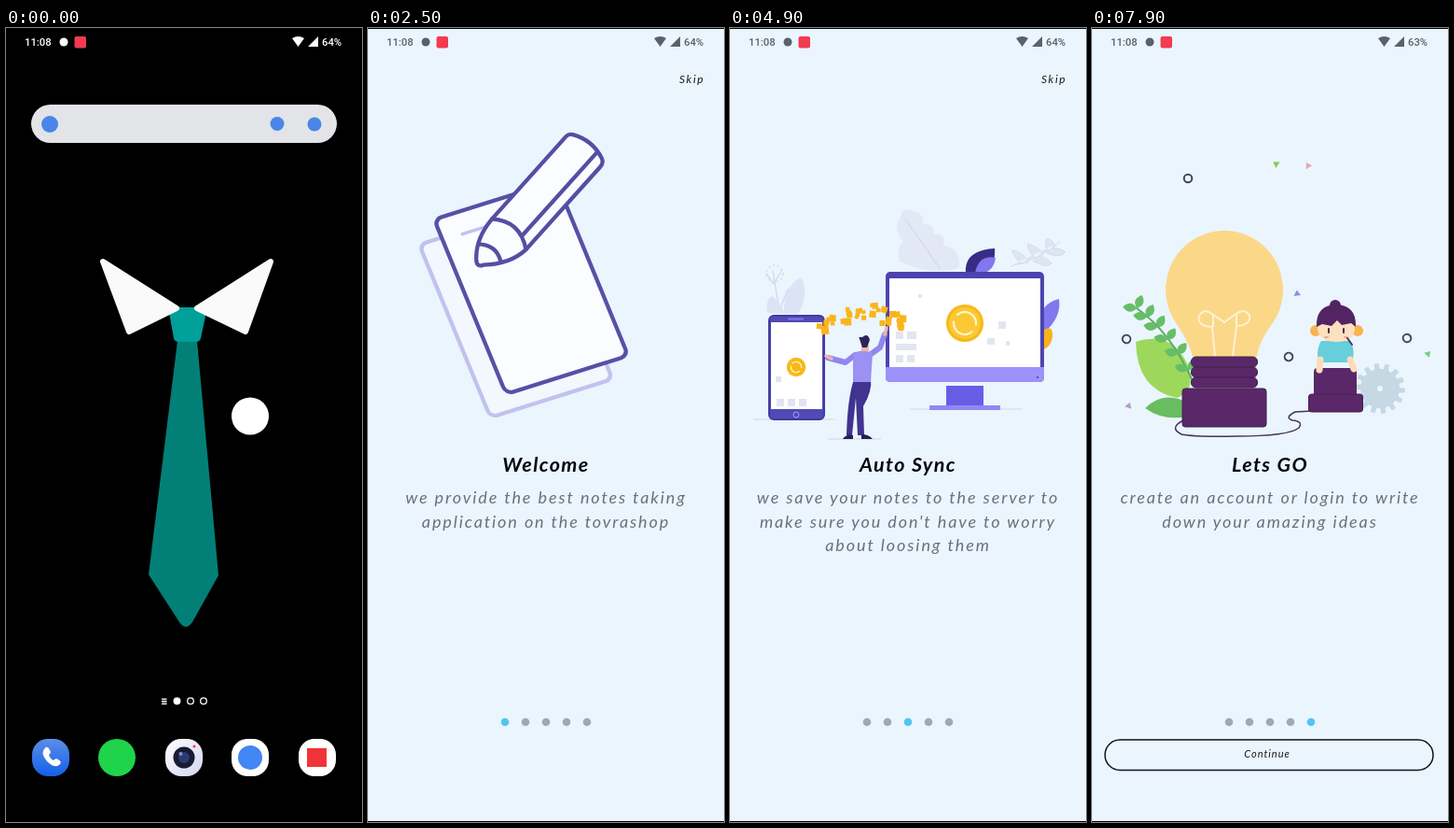
An HTML page that plays this animation: 382 px wide and 850 px high, repeating every 8 s.

```html
<!DOCTYPE html>
<html lang="en">
<head>
<meta charset="utf-8">
<title>Notes app tour</title>
<style>
html, body { margin: 0; width: 100%; height: 100%; overflow: hidden; background: #000; }
svg { display: block; width: 100vw; height: 100vh; }
.status { font: 500 11.3px Roboto, sans-serif; }
.hand { font-family: Lato, sans-serif; font-style: italic; }
.title { font-size: 21.5px; font-weight: 700; letter-spacing: 1.4px; fill: #05070f; }
.sub { font-size: 18px; letter-spacing: 1.9px; fill: #6a7079; }
.small { font-size: 11px; letter-spacing: 1px; fill: #16181c; }
#skip { font-size: 12px; letter-spacing: 1.6px; }
.line { fill: none; stroke-linecap: round; stroke-linejoin: round; }
</style>
</head>
<body>
<svg viewBox="0 0 382 850" preserveAspectRatio="none">
<defs>
  <clipPath id="clip"><rect id="clipBox"/></clipPath>
  <linearGradient id="call" x2="0" y2="1"><stop stop-color="#5d8de8"/><stop offset="1" stop-color="#1260ea"/></linearGradient>
  <linearGradient id="cam" x2="1" y2="1"><stop stop-color="#fff"/><stop offset="1" stop-color="#d3d4f0"/></linearGradient>
  <pattern id="hatch" width="3" height="3" patternUnits="userSpaceOnUse"><rect width="3" height="3" fill="#c9f2fb"/><path d="M0 .7H3M.7 0V3" stroke="#63dcf2" stroke-width="1"/></pattern>
</defs>

<g id="home">
  <rect width="382" height="850"/>
  <rect x="27" y="82" width="328" height="41" rx="20.5" fill="#e2e4e7"/>
  <g fill="#4a86e8"><circle cx="47" cy="103" r="9"/><circle cx="291" cy="102.500" r="7.500"/><circle cx="331" cy="103" r="7.500"/></g>
  <path d="M184 335H205L228 586 200 636Q193 646 186 636L153 585Z" fill="#028078"/>
  <path d="M174 299H216L209 332Q208 336 204 336H185Q181 336 180 332Z" fill="#009f98"/>
  <g fill="#fafafa" stroke="#fafafa" stroke-width="6" stroke-linejoin="round">
    <path d="M104 250 183 300 132 325Z"/><path d="M284 250 205 300 257 325Z"/>
  </g>
  <g fill="none" stroke="#fff" stroke-width="1.300">
    <path d="M167 718.500H172.500M167 721H172.500M167 723.500H172.500"/>
    <circle cx="183.500" cy="720.500" r="3.300" fill="#fff"/><circle cx="198" cy="720.500" r="3.300"/><circle cx="212" cy="720.500" r="3.300"/>
  </g>
  <circle cx="262" cy="415.500" r="20" fill="#fff"/>
  <rect x="28" y="761" width="40" height="40" rx="17" fill="url(#call)"/>
  <path d="M41 772Q44 767 47 773Q49 776 46 778Q47 782 51 784Q53 781 56 783Q61 786 57 789Q52 793 44 785Q37 777 41 772Z" fill="#fff"/>
  <circle cx="119" cy="781" r="20" fill="#1fd44b"/>
  <rect x="171" y="761" width="40" height="40" rx="17" fill="url(#cam)"/>
  <circle cx="191" cy="781" r="11.500" fill="#191a33"/><circle cx="191" cy="781" r="6" fill="#2b3a70"/><circle cx="187.500" cy="777" r="2" fill="#8291c9"/><circle cx="202" cy="769" r="1.600" fill="#e5484d"/>
  <rect x="242" y="761" width="40" height="40" rx="17" fill="#fff"/><circle cx="262" cy="781" r="13" fill="#4285f4"/>
  <rect x="314" y="761" width="40" height="40" rx="17" fill="#fff"/><rect x="323" y="771" width="21" height="20" fill="#f03338"/>
</g>

<g clip-path="url(#clip)">
  <rect id="paper" width="382" height="850"/>
  <g id="content">
    <g class="page">
      <g class="line" stroke-width="4.300">
        <rect id="under" width="137" height="200" rx="8" transform="matrix(.956 -.3 .382 .925 55 232)" stroke="#c1c2ef" fill="#f3f7fe"/>
        <g id="sheet">
          <rect width="137" height="202" rx="8" stroke="#5850a6" fill="#fafcff"/>
          <g id="rules" stroke="#c1c2ef" stroke-width="3.500"></g>
        </g>
        <g id="pencil" stroke="#554ea3" fill="#fafcff">
          <path d="M47-22Q18-21 2-4Q-2 1 4 4Q24 25 47 27H166Q172 27 174 22Q182 2 172-18Q170-22 166-22Z"/>
          <path d="M47-22Q66 2 47 27M17-15Q30 0 19 16M55 14H175" fill="none"/>
        </g>
      </g>
    </g>

    <g class="page">
      <g fill="#fbd987" stroke="#fbd987" stroke-width="2" stroke-linejoin="round"><path id="gearTop"/><path id="gearLow"/></g>
      <path d="M42 426H332" stroke="#e2e8f6" stroke-width="3"/>
      <rect x="105" y="254" width="201" height="152" rx="7" fill="#4940a4"/>
      <rect x="112" y="264" width="187" height="107" fill="#efeffd"/>
      <path d="M298 338H306V371H298Z" fill="#4940a4"/>
      <path d="M105 371H306V399Q306 406 299 406H112Q105 406 105 399Z" fill="#5c7ad6"/>
      <path d="M175 406H236V417H175Z" fill="#4940a4"/><path d="M115 417H280V426H115Z" fill="#5c7ad6"/>
      <path d="M168 262H298V360H168Z" fill="#e4e5f5"/>
      <path d="M147 287H207V363H147Z" fill="#dedff1"/>
      <path d="M153 294H201M153 301H201M153 308H190M153 319H201M153 326H201M180 271H220M180 279H235M268 276H292M268 285H292M268 300H292M268 310H292M268 320H284" stroke="#cfd1e8" stroke-width="3"/>
      <path d="M155 338H176V357H155Z" fill="#c9cbe4"/><path d="M181 341H201M181 348H201M181 355H195" stroke="#f2f2fb" stroke-width="3"/>
      <path d="M234 342V430M262 288V430M234 357H262M234 371H262M234 384H262M234 397H262M234 410H262M234 423H262" class="line" stroke="#4940a4" stroke-width="4.500"/>
      <path d="M227 311H258L254 352 258 389 250 396 242 366 230 354Z" fill="#cf596c"/><path d="M242 318V350L253 392" class="line" stroke="#b84b63" stroke-width="1.500"/>
      <path d="M246 391 258 396V402H248Z" fill="#343078"/>
      <g id="arm"><path d="M230 273Q219 291 206 287L190 283" class="line" stroke="#f3bd83" stroke-width="5"/></g>
      <path d="M229 268Q222 270 224 280L233 278ZM256 266Q265 267 263 281L256 279Z" fill="#48cbb8"/>
      <path d="M231 266Q243 261 257 266L259 281 257 313H227Z" fill="#5481d6"/>
      <path d="M239 257H246V266H239Z" fill="#f3bd83"/><path d="M237 255Q237 249 243 250Q247 252 245 259L238 258Z" fill="#292451"/>
      <path d="M66 399Q58 372 66 360Q72 357 76 361Q79 333 89 323Q96 321 94 344Q100 364 96 382Q92 390 85 399Z" fill="#60d3bd"/>
      <path d="M60 399H88L86 425H62Z" fill="#fbd07a"/>
    </g>

    <g class="page">
      <path d="M182 250Q178 235 186 229Q174 214 183 203Q184 191 195 196Q208 196 207 211Q218 207 219 221Q232 219 229 233Q248 235 246 256Q220 267 182 250Z" fill="#e3e8f6"/>
      <path d="M187 203 225 257M53 303 46 260M53 303Q58 290 62 280M39 263 47 274 55 260" class="line" stroke="#d2d9ee" stroke-width="1.300"/>
      <circle cx="48" cy="263" r="9" fill="none" stroke="#dbe1f2" stroke-width="2" stroke-dasharray="2 3"/>
      <path d="M58 306Q57 277 76 267Q86 284 73 306ZM40 305Q38 290 45 287Q57 296 58 306Z" fill="#dce3f4"/>
      <path d="M301 255Q330 249 354 229M313 253Q302 242 303 238Q316 240 320 252M328 247Q317 235 320 231Q334 235 335 244M341 240Q336 226 341 225Q350 229 347 237M325 249Q339 258 345 252Q339 245 333 245M340 241Q354 247 360 240Q353 235 347 236" fill="#dfe5f4" stroke="#d3dbee"/>
      <path d="M253 262Q251 238 284 236Q286 258 265 263Z" fill="#392c86"/><path d="M263 262Q267 242 285 246Q284 258 272 263Z" fill="#8177ef"/>
      <path d="M335 318Q330 296 353 290Q356 310 337 326Z" fill="#8177ef"/><path d="M337 323Q347 317 346 331Q344 341 337 344Z" fill="#f7b21c"/>
      <path d="M25 419H113M105 440H162M193 408H313" stroke="#e0e5f2" stroke-width="2"/>
      <rect x="42" y="308" width="59" height="111" rx="5" fill="#5149b6" stroke="#443aa1" stroke-width="2"/>
      <path d="M44 315H99V408H44Z" fill="#fff"/><path d="M62 311.500H79" stroke="#8177ef" stroke-width="2"/><circle cx="71" cy="414" r="3" fill="none" stroke="#a59dfa"/>
      <path d="M50 397H58V405H50ZM62 397H70V405H62ZM74 397H82V405H74ZM49 373H55V379H49Z" fill="#e2e3f3"/>
      <rect x="167" y="261" width="170" height="118" rx="5" fill="#4d43ae"/>
      <path d="M171 268H333V363H171Z" fill="#fff"/><path d="M167 363H337V375Q337 379 332 379H172Q167 379 167 375Z" fill="#9c92fa"/>
      <path d="M232 383H272V404H232Z" fill="#685ee6"/><path d="M214 404H290V409H214Z" fill="#9188f3"/>
      <path d="M178 325H186V333H178ZM190 325H200V333H190ZM178 338H200V345H178ZM178 350H186V358H178ZM190 350H198V358H190ZM288 314H296V322H288ZM276 332H284V339H276ZM296 335H300V340H296ZM202 285H206V289H202Z" fill="#e4e5f2"/>
      <circle cx="330" cy="374" r="1.200" fill="#594ec3"/>
      <g transform="translate(252 316)"><circle r="20" fill="#f8b916"/><circle r="17" fill="#fbc936"/><circle class="spin line" r="12" stroke="#fff5d0" stroke-width="2" stroke-dasharray="29 8.700"/></g>
      <g transform="translate(71 363) scale(.51)"><circle r="20" fill="#f8b916"/><circle class="spin line" r="11" stroke="#fff5d0" stroke-width="2.500" stroke-dasharray="26 8.500"/></g>
      <g id="bits" fill="#fbb41a"></g>
      <path d="M133 376H151Q153 388 143 405L144 436H137L135 396 131 436H125Q126 397 133 376Z" fill="#41338f"/>
      <path d="M121 440Q125 434 132 436V440ZM141 440V435Q149 435 153 440Z" fill="#292050"/>
      <path d="M134 350 124 358 105 353M150 350 161 342 166 328" class="line" stroke="#9187ef" stroke-width="6"/>
      <path d="M109 354 103 351M166 328 168 321" class="line" stroke="#f0b7a5" stroke-width="3.500"/>
      <path d="M132 348Q143 343 153 348L151 379H132Z" fill="#9b90f3"/>
      <path d="M141 339H149V346H141Z" fill="#f0b7a5"/><path d="M139 333Q137 330 142 331Q148 326 150 334L147 342H142Z" fill="#2c245c"/>
    </g>

    <g class="page">
      <g stroke-linejoin="round">
        <path d="M130 217Q131 207 140 202L222 153Q229 150 235 155L239 160 140 212V371L133 366Q130 365 130 361Z" fill="url(#hatch)" stroke="#9fbfca"/>
        <path d="M138 219Q138 211 145 207L230 157Q239 153 239 164V307Q239 316 232 321L148 370Q138 375 138 364Z" fill="#edf5fa" stroke="#c4d2da"/>
        <path d="M146 221 230 172V304L146 352Z" fill="#f1f8fc" stroke="#bdc8cf"/>
      </g>
    </g>

    <g class="page">
      <path d="M47 336Q88 323 104 364Q111 389 91 396Q48 387 47 336Z" fill="#9dd85c"/>
      <path d="M57 407Q77 387 104 402V416Q76 421 57 407Z" fill="#68bd61"/>
      <path d="M48 300Q85 326 108 378" class="line" stroke="#54ac64" stroke-width="2"/>
      <g id="leaves" fill="#69bd68"></g>
      <path d="M108 352Q105 338 91 317A63 63 0 1 1 193 317Q178 338 177 352Z" fill="#fbd788"/>
      <path d="M132 352 129 320Q112 319 115 308Q120 299 130 307L142 315 153 307Q164 299 169 308Q171 318 155 319L151 352M130 307V319M155 307V319" class="line" stroke="#fff2d5" stroke-width="2"/>
      <path d="M98 420Q82 428 96 435Q112 438 155 437Q211 437 222 428Q227 421 215 420Q206 417 218 411L236 410" class="line" stroke="#473557" stroke-width="1.500"/>
      <g fill="#5a2868" stroke="#42204e"><rect x="106.500" y="352" width="71" height="11" rx="5"/><rect x="106.500" y="363" width="71" height="11" rx="5"/><rect x="106.500" y="374" width="71" height="11" rx="5"/><rect x="97" y="386" width="90" height="41" rx="3"/></g>
      <path id="gearGrey" fill="#c5d8e4"/>
      <rect x="238" y="364" width="46" height="31" rx="4" fill="#5a2868"/><rect x="232.500" y="392" width="58" height="19" rx="3" fill="#5a2868" stroke="#42204e"/>
      <g id="girl">
        <path d="M246 335H277Q283 345 279 358H243Q240 344 246 335Z" fill="#67cedb"/>
        <path d="M245 355 244 366M277 355 281 365" class="line" stroke="#fbdcba" stroke-width="7"/>
        <circle cx="240" cy="324" r="6" fill="#f8b44e"/><circle cx="285" cy="324" r="6" fill="#f8b44e"/>
        <circle cx="261" cy="297" r="6" fill="#532463"/>
        <path d="M242 311H282V323Q280 336 262 336Q244 336 242 323Z" fill="#fde0bf"/>
        <path d="M241 320Q240 297 262 296Q284 297 283 320L278 316 268 318 263 313 257 319 247 317Z" fill="#532463"/>
        <path d="M254 322V326M270 322V326" class="line" stroke="#48304c" stroke-width="2"/>
        <path d="M250 331H253M271 331H274" class="line" stroke="#f4a79f" stroke-width="2"/>
        <path d="M274 332 279 339" class="line" stroke="#44395b" stroke-width="2"/>
      </g>
      <g id="confetti"></g>
    </g>
    <g id="dots"></g>
    <text id="skip" class="hand small" x="334" y="59">Skip</text>
    <g id="next"><rect x="14" y="762" width="352" height="32.500" rx="16" fill="none" stroke="#101318" stroke-width="1.500"/><text class="hand small" x="188" y="781" text-anchor="middle">Continue</text></g>
  </g>
</g>

<g id="status" class="status">
  <text x="20" y="19">11:08</text><circle cx="62" cy="15" r="4.500"/>
  <rect x="73.500" y="9" width="12.500" height="12.500" rx="2" fill="#f23a50"/>
  <path d="M307 11Q313.500 7 320 11L313.500 20ZM324 20 335 9V20Z"/><text id="battery" x="339" y="19">64%</text>
</g>
</svg>
<script>
const LOOP = 8000, STEP = 100, W = 382;
const swipes = [3200, 4300, 6000, 7000];
const copy = [
  ["Welcome", "we provide the best notes taking", "application on the tovrashop"],
  ["Account Management", "create one account and access all", "your notes from any brelvin device"],
  ["Auto Sync", "we save your notes to the server to", "make sure you don't have to worry", "about loosing them"],
  ["Pined Notes", "pin your most important notes to the", "top"],
  ["Lets GO", "create an account or login to write", "down your amazing ideas"]
];

const $ = id => document.getElementById(id);
const set = (node, attrs) => { for (const k in attrs) node.setAttribute(k, attrs[k]); return node; };
const add = (parent, tag, attrs) => parent.appendChild(set(document.createElementNS("http://www.w3.org/2000/svg", tag), attrs));
const span = (t, from, to) => Math.min(1, Math.max(0, (t - from) / (to - from)));
const easeOut = x => 1 - (1 - x) ** 3;
const easeBoth = x => x * x * (3 - 2 * x);
const mix = (a, b, k) => a + (b - a) * k;
const tint = (a, b, k) => `rgb(${a.map((v, i) => Math.round(mix(v, b[i], k)))})`;

let seed = 17;
const rand = () => (seed = seed * 16807 % 2147483647) / 2147483647;

function gear(teeth, outer, inner, hole) {
  let d = "";
  for (let i = 0; i < teeth; i++) {
    [[-.3, inner], [-.2, outer], [.2, outer], [.3, inner]].forEach(([off, r]) => {
      const a = (i + off) / teeth * Math.PI * 2;
      d += `${d ? "L" : "M"}${(r * Math.cos(a)).toFixed(1)} ${(r * Math.sin(a)).toFixed(1)}`;
    });
  }
  return `${d}ZM${hole} 0A${hole} ${hole} 0 1 0 ${-hole} 0A${hole} ${hole} 0 1 0 ${hole} 0Z`;
}

const pages = [...document.querySelectorAll(".page")];
pages.forEach((page, i) => copy[i].forEach((line, n) => {
  const y = n ? 483.5 + n * 25.5 : 475;
  add(page, "text", { x: 191, y, "text-anchor": "middle", class: "hand " + (n ? "sub" : "title") }).textContent = line;
}));

const rules = [95, 95, 95, 95, 56].map((len, i) => ({ len, node: add($("rules"), "line", { x1: 22, y1: 24 + 34 * i, y2: 24 + 34 * i }) }));
const dots = pages.map((_, i) => add($("dots"), "circle", { cx: 147 + 22 * i, cy: 743, r: 4.3 }));
const spins = [...document.querySelectorAll(".spin")];
const gears = [
  { id: "gearTop", shape: [8, 24, 18, 11], x: 329, y: 281, phase: 22.5, speed: .045 },
  { id: "gearLow", shape: [9, 36, 28, 16], x: 315, y: 362, phase: -11, speed: -.045 },
  { id: "gearGrey", shape: [14, 27, 21, 3], x: 309, y: 386, phase: 0, speed: .045 }
];
gears.forEach(g => set($(g.id), { d: gear(...g.shape), "fill-rule": "evenodd" }));

const bits = Array.from({ length: 38 }, () => {
  const size = 4 + rand() * 4;
  return { at: rand(), lift: (rand() - .5) * 17, turn: rand() * 30 - 10, node: add($("bits"), "rect", { width: size, height: size }) };
});

for (let i = 0; i < 6; i++) {
  const k = i / 5, x = mix(48, 103, k), y = 300 + 66 * k * mix(.65, 1, k);
  [-68 + 20 * k, 186 + 10 * k].forEach(turn =>
    add($("leaves"), "path", { d: "M0 0Q7-9 15 0Q7 9 0 0Z", transform: `translate(${x} ${y}) rotate(${turn})` }));
}

const floaters = [
  [103, 161], [37, 333], [211, 352], [338, 332],
  [198, 146, "#88c957"], [232, 148, "#eaa9a8"], [220, 285, "#9d8be0"], [39, 405, "#b79bd1"], [360, 349, "#72d07c"]
].map(([x, y, fill], i) => ({
  x, y, i, node: fill
    ? add($("confetti"), "path", { d: "M-3-3 4 0-2 4Z", fill })
    : add($("confetti"), "circle", { r: 4.3, fill: "none", stroke: "#45445f", "stroke-width": 2 })
}));

function drawOpening(t) {
  const open = t >= 400 ? easeOut(span(t, 300, 800)) : 0;
  set($("clipBox"), {
    x: mix(242, 0, open), y: mix(395.5, 1, open),
    width: t < 400 ? 0 : mix(40, W, open), height: t < 400 ? 0 : mix(40, 848, open), rx: mix(20, 0, open)
  });
  $("paper").setAttribute("fill", tint([255, 255, 255], [235, 245, 253], open));
  $("content").setAttribute("opacity", span(t, 800, 1100));
  $("status").setAttribute("fill", t < 700 ? "#fff" : "#59616a");
  $("battery").textContent = t < 7400 ? "64%" : "63%";
}

function drawPencil(t) {
  const k = easeBoth(span(t, 1800, 2400)), solid = span(t, 1700, 2200);
  const stroke = easeBoth(span(t, 2500, 3100)) * 75;
  const wobble = Math.sin((t - 1600) / 130) * 3 * (1 - k);
  const x = mix(143, 118, k) + wobble + stroke, y = mix(266, 254, k) - wobble * .3 - stroke * .3;
  set($("sheet"), { transform: `matrix(.956 -.3 .382 .925 ${mix(77, 71, k)} ${mix(195, 205, k)})`, opacity: mix(.65, 1, solid) });
  set($("pencil"), { transform: `translate(${x} ${y}) rotate(${mix(-26, -48, k)})`, opacity: mix(.92, 1, solid) });
  $("under").setAttribute("opacity", mix(.75, 1, solid));
  const fresh = t >= 2200;
  $("rules").setAttribute("opacity", fresh ? 1 : .75 * (1 - solid));
  rules.forEach(({ len, node }, i) => {
    const shown = fresh ? (i ? 0 : Math.min(len, 27 + stroke)) : len;
    set(node, { x2: 22 + shown, visibility: shown ? "inherit" : "hidden" });
  });
}

function drawScenes(t) {
  gears.forEach(({ id, x, y, phase, speed }) => $(id).setAttribute("transform", `translate(${x} ${y}) rotate(${phase + (t - 3800) * speed})`));
  $("arm").setAttribute("transform", `rotate(${4 * Math.sin((t - 3800) / 260)} 230 273)`);
  spins.forEach(node => node.setAttribute("transform", `rotate(${t * .12})`));
  bits.forEach(({ at, lift, turn, node }) => {
    const u = (at + t / 2200) % 1;
    const x = 90 + u * 96, y = 301 + 17 * (2 * u - 1) ** 2 + lift;
    node.setAttribute("transform", `translate(${x} ${y}) rotate(${turn})`);
  });
  floaters.forEach(({ x, y, i, node }) => {
    const a = (t - 7900) / 420;
    node.setAttribute("transform", `translate(${x + 3 * Math.sin(a) * (i % 2 ? 1 : -1)} ${y + 5 * Math.sin(a * .8)}) rotate(${(t - 7900) * .06 + i * 25})`);
  });
  $("girl").setAttribute("transform", `translate(0 ${Math.sin((t - 7900) / 300)})`);
}

function draw(t) {
  drawOpening(t);
  const pos = swipes.reduce((sum, s) => sum + easeOut(span(t, s, s + 400)), 0);
  pages.forEach((page, i) => set(page, {
    transform: `translate(${(i - pos) * W} 0)`,
    visibility: Math.abs(i - pos) < 1 ? "visible" : "hidden"
  }));
  dots.forEach((dot, i) => dot.setAttribute("fill", tint([160, 169, 179], [83, 197, 241], Math.max(0, 1 - Math.abs(i - pos)))));
  $("skip").setAttribute("opacity", 1 - span(t, 7200, 7400));
  $("next").setAttribute("opacity", span(t, 7500, 7800));
  drawPencil(t);
  drawScenes(t);
}

const start = performance.now();
function tick(now) {
  const t = Math.max(0, now - start) % LOOP;
  draw(Math.floor(t / STEP) * STEP);
  requestAnimationFrame(tick);
}
draw(0);
requestAnimationFrame(tick);
</script>
</body>
</html>
```
